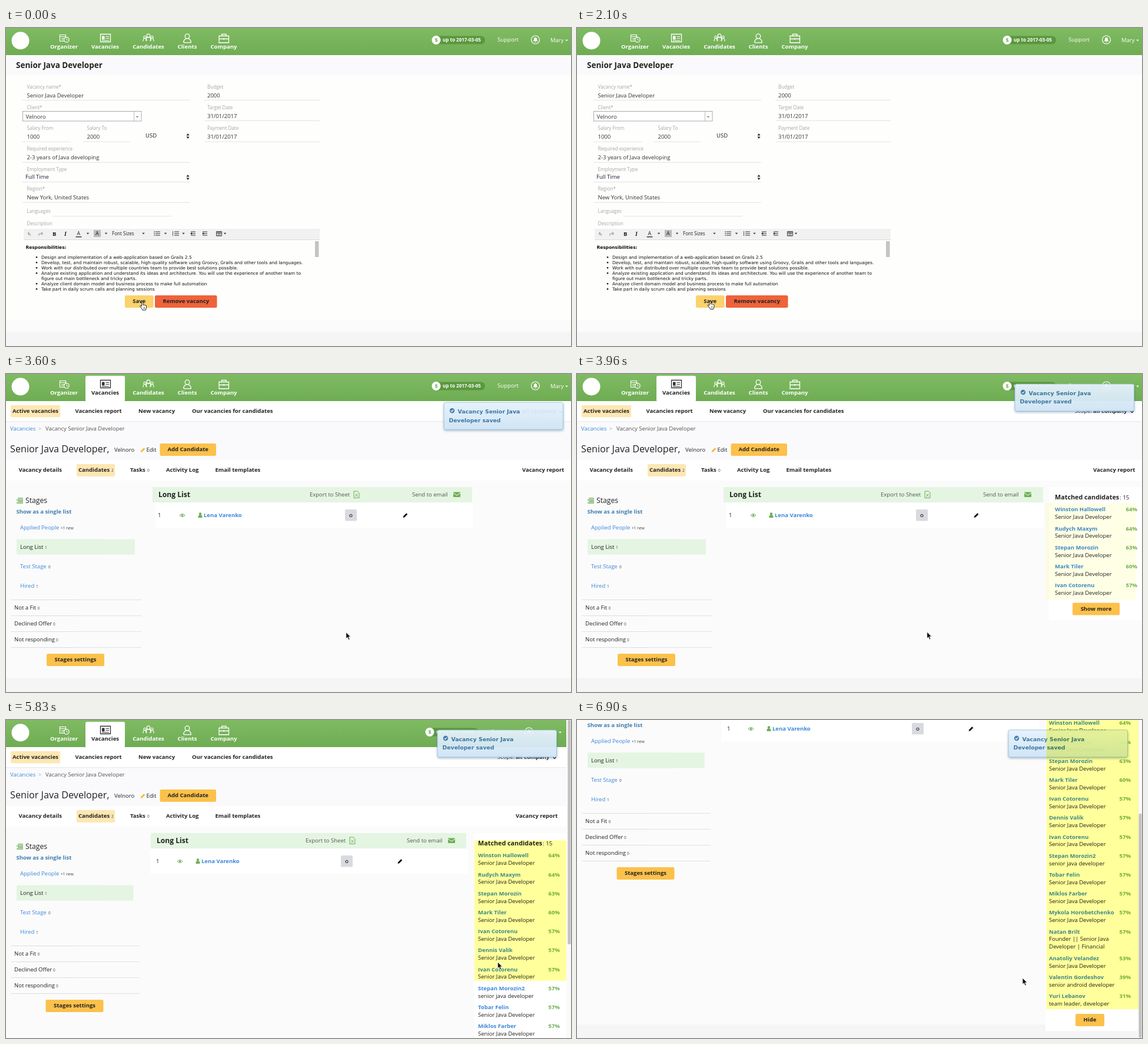
Write an HTML page that moves like this. It is 960 px wide and 540 px high and loops after 8000 ms.

```html
<!DOCTYPE html>
<html lang="en">
<head>
<meta charset="utf-8">
<title>Vacancy walkthrough</title>
<style>
html, body { margin: 0; width: 100%; height: 100%; overflow: hidden; background: #fdfdfd; }
svg { display: block; width: 960px; height: 540px; font-family: "Open Sans", "Noto Sans", sans-serif; }
.verdana { font-family: "DejaVu Sans", sans-serif; }
#glow { mix-blend-mode: multiply; }
</style>
</head>
<body>
<svg id="stage" viewBox="0 0 960 540"></svg>
<script>
const INK = '#222', LINK = '#3d87d9', GREEN = '#6fae55', PALE = '#e4f5e2', GOLD = '#fcc14b', CREAM = '#fde7b2';

// Text is placed by the vertical centre of its capitals.
const T = (x, y, s, size = 9.5, fill = INK, more = '') =>
  `<text x="${x}" y="${(y + size * .36).toFixed(2)}" font-size="${size}" fill="${fill}" ${more}>${s}</text>`;
const B = (x, y, s, size = 9.5, fill = INK, more = '') => T(x, y, s, size, fill, 'font-weight="700" ' + more);
const R = (x, y, w, h, fill, rx = 0, more = '') =>
  `<rect x="${x}" y="${y}" width="${w}" height="${h}" fill="${fill}" rx="${rx}" ${more}/>`;
const C = (x, y, r, fill, more = '') => `<circle cx="${x}" cy="${y}" r="${r}" fill="${fill}" ${more}/>`;
const P = (d, fill, stroke = 'none', w = 1) => `<path d="${d}" fill="${fill}" stroke="${stroke}" stroke-width="${w}"/>`;
const L = (x1, x2, y, c = '#dcdcdc') => R(x1, y, x2 - x1, .8, c);
const G = (id, ...parts) => `<g id="${id}">${parts.join('')}</g>`;
// Group that shifts left when the page scrollbar appears.
const S = (dx, ...parts) => `<g data-dx="${-dx}">${parts.join('')}</g>`;
const button = (x, y, w, s, fill = GOLD, id = '') =>
  R(x, y, w, 21, fill, 2.5, id && `id="${id}"`) + B(x + w / 2, y + 10, s, 9.5, INK, 'text-anchor="middle"');
const pencil = (x, y, c) => P(`M${x} ${y + 8}l.8 -2.8 5 -5 2 2 -5 5z`, c);
const person = (x, y, c) => C(x, y - 2.5, 2.2, c) + P(`M${x - 3.5} ${y + 4}v-2q0 -2.5 2 -2.5h3q2 0 2 2.5v2z`, c);
const caret = (x, y, c = '#444') => P(`M${x - 2.3} ${y - 1.2}h4.6l-2.3 2.7z`, c);
const updown = (x, y) => P(`M${x - 2.5} ${y - 1}l2.5 -3.5 2.5 3.5zM${x - 2.5} ${y + 1}l2.5 3.5 2.5 -3.5z`, INK);

const badge = c => P('M160.500 10.500h17v13h-17z', 'none', c, 1.3) + R(163, 13.5, 4.5, 6, c, 1) +
  P('M169.500 14.500h5.500M169.500 17.500h5.500M163 21h12', 'none', c, 1.1);
const head = (x, y, r, w, h) =>
  `M${x - r} ${y}a${r} ${r} 0 1 0 ${2 * r} 0a${r} ${r} 0 1 0 ${-2 * r} 0M${x - w} ${y + r + h}q0 ${-h} ${w} ${-h}t${w} ${h}`;
const navText = (x, s, c = '#fff') => B(x, 32, s, 9.6, c, 'text-anchor="middle"');

const header =
  R(0, 0, 960, 46, 'url(#green)') + C(24.5, 21.500, 15, '#fff') +
  P('M91.500 11.500h10v11h-10zM91.500 14.500h10M94 17.500h5M94 20h4', 'none', '#fff', 1.2) +
  C(103, 20, 4.2, GREEN, 'stroke="#fff" stroke-width="1.2"') + P('M103 17.500v3h2.500', 'none', '#fff') +
  badge('#fff') +
  P(head(242, 13, 2.8, 4.5, 5.5) + head(236, 15.5, 2, 3, 5) + head(248, 15.5, 2, 3, 5), 'none', '#fff', 1.2) +
  P(head(308, 14, 3.8, 6.2, 7) + 'h-12.400', 'none', '#fff', 1.3) +
  P('M362 13.500h16.500v11.500h-16.500zM366.500 13.500v-3h7.500v3M362 18.500h16.500M370.200 17v3', 'none', '#fff', 1.3) +
  navText(98.5, 'Organizer') + navText(168.5, 'Vacancies') + navText(242, 'Candidates') +
  navText(308, 'Clients') + navText(370, 'Company') +
  S(11,
    R(724, 13.500, 90, 14, '#5a983e', 7), C(731, 20.500, 7.500, '#fff'),
    B(731, 20.500, '$', 9, GREEN, 'text-anchor="middle"'), B(742, 20.500, 'up to 2017-03-05', 8.05, '#fff'),
    T(835, 20, 'Support', 9.6, '#fff'),
    C(899.500, 20, 7, 'none', 'stroke="#fff" stroke-width="1.2"'),
    P('M895.500 22.500q1.500 -1 1.500 -3.500 0 -3 2.500 -3t2.500 3q0 2.500 1.500 3.500zM898.500 23.500h2v1h-2z', '#fff'),
    T(925, 20.500, 'Mary', 9.5, '#fff'), caret(952.500, 21, '#fff'));

const label = (x, y, s) => T(x, y, s, 8.1, '#a5a5a5');
const field = (x, y, name, value, x1, x2) => label(x, y, name) + T(x, y + 14.4, value, 9.5, '#333') + L(x1, x2, y + 22.2);
const duties = [
  'Design and implementation of a web-application based on Grails 2.5',
  'Develop, test, and maintain robust, scalable, high-quality software using Groovy, Grails and other tools and languages.',
  'Work with our distributed over multiple countries team to provide best solutions possible.',
  'Analyze existing application and understand its ideas and architecture. You will use the experience of another team to',
  '>figure out main bottleneck and tricky parts.',
  'Analyze client domain model and business process to make full automation',
  'Take part in daily scrum calls and planning sessions'];
const rows = (x, y, marks) => P(`M${x} ${y - 3}h8M${x} ${y}h8M${x} ${y + 3}h8`, 'none', '#333', 1.2) + marks;
const toolbar =
  R(30, 341, 503, 17.500, '#f1f1f1') + L(30, 533, 359, '#ccc') +
  P('M41 353q2 -4 -4 -4M37 349l2.500 -2.500M37 349l2.500 2.500M56 353q-2 -4 4 -4h2M62.500 349l-2.500 -2.500M62.500 349l-2.500 2.500', 'none', '#aaa', 1.3) +
  B(79, 349.500, 'B', 9.5) + B(99, 349.500, 'I', 10, INK, 'font-style="italic" font-family="Liberation Serif, serif"') +
  T(120.500, 348.500, 'A', 9) + R(118.500, 354, 10, 1.3, INK) + R(149, 343, 12, 12, '#bbb') + T(152, 349, 'A', 9) +
  T(180, 349.500, 'Font Sizes', 8.1) +
  [139, 170, 233.500, 271, 301.500, 372].map(x => caret(x, 349)).join('') +
  rows(254, 349, R(251.500, 345.300, 1.400, 1.400, INK) + R(251.500, 348.300, 1.400, 1.400, INK) + R(251.500, 351.300, 1.400, 1.400, INK)) +
  rows(286, 349, P('M283.500 345v8', 'none', '#555')) +
  rows(314, 349, P('M316 347l-3 2 3 2z', INK)) + rows(334, 349, P('M334 347l3 2 -3 2z', INK)) +
  P('M357.500 345.500h9v7.500h-9zM357.500 348h9M360.500 345.500v7.500M363.500 345.500v7.500', 'none', '#333');

const form = G('form',
  R(0, 46, 960, 34, '#fafafc'), R(0, 80, 960, 416, '#fefefd'), B(17, 63.500, 'Senior Java Developer', 13.5),
  field(35.5, 100, 'Vacancy name*', 'Senior Java Developer', 28, 313),
  field(342, 100, 'Budget', '2000', 337, 533),
  field(342, 135, 'Target Date', '31/01/2017', 337, 533),
  field(342, 170.500, 'Payment Date', '31/01/2017', 337, 533),
  label(35.5, 135, 'Client*'),
  R(28.500, 141.500, 201.500, 16.500, '#fff', 0, 'stroke="#aaa"'), R(217, 142, 1, 16, '#bbb'), caret(223, 151, '#888'),
  T(33.500, 150.500, 'Velnoro', 9.5, '#333'),
  field(35.5, 170.500, 'Salary From', '1000', 28, 110),
  field(137.500, 170.500, 'Salary To', '2000', 131, 210),
  T(237, 183, 'USD'), updown(309, 183.500),
  field(35.5, 205.500, 'Required experience', '2-3 years of Java developing', 28, 313),
  label(35.5, 240, 'Employment Type'), T(33, 253, 'Full Time', 9.5, '#1d1d3a'), updown(309, 253.500), L(28, 313, 261),
  field(35.5, 273.500, 'Region*', 'New York, United States', 28, 313),
  label(35.5, 311.500, 'Languages'), L(79, 281, 319), label(35.5, 332, 'Description'),
  toolbar, R(525, 362, 6.500, 27, '#c4c4c4', 1),
  B(33.500, 372, 'Responsibilities:', 7.4, '#111', 'class="verdana"'),
  ...duties.map((s, i) => {
    const y = 389 + i * 9;
    return (s[0] === '>' ? '' : C(52, y + .3, 1.3, '#111')) + T(60, y, s.replace('>', ''), 7.44, '#111', 'class="verdana"');
  }),
  button(202, 454, 48.500, 'Save', '#fbd26c'), button(253, 454, 105.500, 'Remove vacancy', '#ee633b'));

const count = (x, y, s) => T(x, y + 1, s, 6.5, '#444');
const title = (x, loaded) => pencil(x, 125, '#f5b73c') + T(x + 10, 129, 'Edit') +
  button(x + 33, 118, 95.500, 'Add Candidate') +
  (loaded ? T(7, 127.500, 'Senior Java Developer,', 16.2) + T(184, 129, 'Velnoro') + T(67, 92.500, 'Vacancy Senior Java Developer', 9.5, '#555')
    : T(7, 127.500, ',', 16.2) + T(67, 92.500, 'Vacancy', 9.5, '#555'));

const people = [['Winston Hallowell', 64], ['Rudych Maxym', 64], ['Stepan Morozin', 63], ['Mark Tiler', 60],
  ['Ivan Cotorenu', 57], ['Dennis Valik', 57], ['Ivan Cotorenu', 57], ['Stepan Morozin2', 57, 'senior java developer'],
  ['Tobar Felin', 57], ['Miklos Farber', 57], ['Mykola Horobetchenko', 57],
  ['Natan Brilt', 57, 'Founder || Senior Java', 'Developer | Financial'], ['Anatoliy Velandez', 53],
  ['Valentin Gordeshov', 39, 'senior android developer'], ['Yuri Lebanov', 31, 'team leader, developer']];
const match = ([name, score, job = 'Senior Java Developer', tail], i) => {
  const y = 230 + i * 32.2 + (i > 11 ? 13 : 0);
  return S(10, B(812, y, name, 9.5, LINK), T(812, y + 12.800, job), tail ? T(812, y + 25.500, tail) : '') +
    S(11, B(952, y, score + '%', 9.5, GREEN, 'text-anchor="end"'));
};

const vacancy = G('vacancy',
  R(135, 3, 67, 44, '#fff', 3), badge('#333'), navText(168.500, 'Vacancies', INK),
  R(0, 46, 960, 34.500, '#fff'), R(0, 80, 960, 66, '#fafafc'), R(0, 80.500, 960, .8, '#e2e2e2'),
  R(0, 146, 960, 35, '#fff'),
  R(8, 53, 84, 20.500, CREAM, 2), B(11, 63, 'Active vacancies'), B(117.500, 63, 'Vacancies report'),
  B(225, 63, 'New vacancy'), B(316, 63, 'Our vacancies for candidates'),
  S(11, T(846, 63, 'Scope:'), B(877, 63, 'all company'), P('M940.500 63l2.500 2.500 2.500 -2.500', 'none', INK, 1.3)),
  T(7, 92.500, 'Vacancies', 9.5, LINK), T(55, 92.500, '&gt;', 9, '#aaa'),
  B(21.500, 163, 'Vacancy details'), R(120, 153, 65, 21, CREAM, 2), B(123, 163, 'Candidates'), B(211, 163, 'Tasks'),
  S(11, B(877, 163, 'Vacancy report')),
  P('M20 211h9M18 213.700h11M20 216.400h9M18 219h11', 'none', GREEN, 1.6),
  T(33, 214.500, 'Stages', 12.2), B(17.500, 234, 'Show as a single list', 9.5, '#3f7dac'),
  T(24, 260.500, 'Applied People', 9.5, LINK),
  R(18, 280.500, 150, 26, PALE), S(2.5, R(60, 280.500, 159, 26, PALE)),
  T(24, 293.500, 'Long List'), count(66, 293.500, '1'), T(24, 326.500, 'Test Stage', 9.5, LINK), count(72, 326.500, '0'),
  T(24, 359.500, 'Hired', 9.5, LINK), count(51, 359.500, '1'),
  ...[383, 410, 437, 464].map(y => L(8, 120, y) + S(3, L(20, 230, y))),
  T(14, 397, 'Not a Fit'), count(53.500, 397, '0'), T(14, 424, 'Declined Offer'), count(80, 424, '0'),
  T(14, 451, 'Not responding'), count(85, 451, '0'),
  S(1.5, button(69, 475, 98, 'Stages settings')),
  S(3, R(249, 192, 200, 26, PALE)), S(10, R(300, 192, 492, 26, PALE)), S(3, B(259, 205, 'Long List', 12.1)),
  S(7, T(516, 205, 'Export to Sheet', 9.5, '#555'),
    P('M591 199h6l3 3v8.500h-9zM593.500 203.500l4 5M597.500 203.500l-4 5', 'none', GREEN)),
  S(9, T(690, 205, 'Send to email', 9.5, '#555'), R(760, 200.500, 12, 8.500, GREEN, 1),
    P('M760 202l6 4 6 -4', 'none', '#fff')),
  G('empty', title(25.500, false), count(179, 163, '0'), B(266, 163, 'Activity Log'), B(349, 163, 'Email templates')),
  G('loaded', title(228.500, true), count(179, 163, '2'), count(240, 163, '0'),
    B(272, 163, 'Activity Log'), B(355.500, 163, 'Email templates'), count(93, 260.500, '+1 new'),
    S(8, R(253, 219, 540, 42.500, '#fff')),
    S(3, T(258, 239.500, '1')),
    S(4, P('M295 240q4.500 -5 9 0q-4.500 5 -9 0z', 'none', GREEN), C(299.500, 240, 1.7, GREEN),
      person(330, 240, GREEN), B(336, 239.500, 'Lena Varenko', 9.5, LINK)),
    S(7, R(576, 230, 20, 19.500, '#d9dadf', 1.500), B(586, 240, 'O', 7.5, '#333', 'text-anchor="middle"')),
    S(9, pencil(674.500, 236, '#111'))),
  G('panel',
    S(6, R(802, 192, 158, 226, '#fff', 0, 'id="card"')),
    S(10, B(812, 209, 'Matched candidates', 10.8), T(922, 209, ': 15', 9.8)),
    ...people.slice(0, 5).map(match),
    G('less', button(842, 388.500, 80, 'Show more', GOLD, 'more')),
    G('all', ...people.slice(5).map((p, i) => match(p, i + 5)), button(847, 724, 49, 'Hide'))));

const toast = G('toast',
  R(744, 2, 203, 46, '#456a88', 3, 'opacity=".5" filter="url(#soft)"'),
  R(744, 0, 202.500, 46, 'url(#sky)', 3, 'stroke="#92bada" stroke-width=".8"'),
  C(758, 14, 4.200, '#3b79ae'), P('M756 14l1.600 1.600 2.700 -3.200', 'none', '#fff', 1.2),
  B(767.500, 15.500, 'Vacancy Senior Java', 9.35, '#34709f', 'class="verdana"'),
  B(752.500, 30, 'Developer saved', 9.35, '#34709f', 'class="verdana"'));

const stage = document.getElementById('stage');
const fade = (id, a, b) => `<linearGradient id="${id}" x2="0" y2="1"><stop stop-color="${a}"/><stop offset="1" stop-color="${b}"/></linearGradient>`;
stage.innerHTML =
  `<defs>${fade('green', '#80bb63', '#6eac52')}${fade('sky', '#e6f2fb', '#cfe4f5')}
   <filter id="soft" x="-10%" y="-30%" width="120%" height="160%"><feGaussianBlur stdDeviation="2"/></filter></defs>` +
  R(0, 0, 960, 540, '#fbfbfc') +
  G('page', header, R(0, 516, 960, 24, '#f5f5f5', 0, 'id="footer"'), form, vacancy) +
  G('bar', R(952, 0, 8, 540, '#fafafa'), R(954.500, 0, 5, 381, '#c2c2c2', 2.500, 'id="thumb"')) + toast +
  R(0, 0, 1, 1, '#ffff9b', 0, 'id="glow"') +
  C(226, 463.500, 1, 'none', 'id="ring" stroke="#888" stroke-width="1.5"') +
  G('arrow', P('M0 0v11l2.500 -2.300 1.900 4.300 2 -.9 -1.900 -4.200h3.500z', '#111', '#fff', .8)) +
  G('hand', P('M-1 1q0 -1.300 1.200 -1.300t1.200 1.300v4q1 -.8 2 .1 1 -.7 1.900 .3 1.500 -.4 1.700 1.200v3.200l-1.200 3.700h-5.300l-1.600 -3 -2.700 -3.400q0 -1.600 1.500 -1l1.300 1.200z', '#fff', '#111', .9) +
    P('M2.400 8.500v3M4.200 8.500v3', 'none', '#111', .6));

const $ = Object.fromEntries([...stage.querySelectorAll('[id]')].map(e => [e.id, e]));
const shifted = stage.querySelectorAll('[data-dx]');
const show = (e, on) => e.setAttribute('display', on ? 'inline' : 'none');
const move = (e, x, y) => e.setAttribute('transform', `translate(${x} ${y})`);
const set = (e, o) => { for (const k in o) e.setAttribute(k, o[k]); };
const ramp = (t, a, b) => Math.min(1, Math.max(0, (t - a) / (b - a)));
const ease = p => p * p * (3 - 2 * p);
const mix = (a, b, p) => a + (b - a) * p;

// time, x, y of the pointer's tip
const track = [[0, 231.500, 465.500], [29, 231.500, 465.500], [30, 229, 465], [200, 229, 465], [260, 226, 464],
  [2500, 226, 464], [2830, 393, 446], [3220, 560, 439], [3960, 594.500, 438], [4160, 621, 437],
  [4640, 876, 397], [5560, 876, 397], [6250, 757, 438], [8000, 757, 438]];
function pointer(t) {
  const i = track.findIndex(k => k[0] > t), [a, x, y] = track[i - 1], [b, u, v] = track[i];
  const p = ramp(t, a, b), q = a >= 4160 ? ease(p) : p;
  return [mix(x, u, q), mix(y, v, q)];
}

function draw() {
  const t = performance.now() % 8000;
  const saved = t >= 2540, loaded = t >= 3400, open = t >= 5650;
  show($.form, !saved); show($.vacancy, saved);
  show($.empty, !loaded); show($.loaded, loaded); show($.panel, t >= 3640);
  show($.less, !open); show($.all, open); show($.bar, open);
  shifted.forEach(e => move(e, open ? e.dataset.dx : 0, 0));
  set($.card, { height: open ? 561 : 226 });
  set($.footer, { y: open ? 742 : 516 });
  set($.more, { fill: t >= 4580 ? '#fbd064' : GOLD });

  // The page scrolls in four even jumps after a first short one.
  const p = Math.floor(ramp(t, 6660, 6900) * 4) / 4, scroll = t < 6660 ? 0 : mix(18, 225, p);
  move($.page, 0, -scroll);
  set($.thumb, { y: scroll * 540 / 765 });

  set($.toast, { opacity: .95 * ramp(t, 2640, 2760) });
  move($.toast, open ? -11 : 0, mix(80, 17, ease(ramp(t, 3400, 3800))));

  const g = ease(ramp(t, 5650, 6300));
  const top = mix(mix(219, 142, g), -65, p), bottom = mix(mix(383, 698, g), 491, p);
  set($.glow, { x: mix(796, 797.500, p), y: top, height: bottom - top,
    width: mix(mix(154, 164, g), 156.500, p), opacity: ramp(t, 3860, 4260) });

  const r = ramp(t, 1660, 2100);
  show($.ring, r > 0 && r < 1);
  set($.ring, { r: mix(2, 28, r), opacity: .6 * (1 - r) });

  const hand = t < 2540 || t >= 4580 && t < 5700, at = pointer(t);
  show($.hand, hand); show($.arrow, !hand);
  move($.hand, ...at); move($.arrow, ...at);
  requestAnimationFrame(draw);
}
draw();
</script>
</body>
</html>
```
